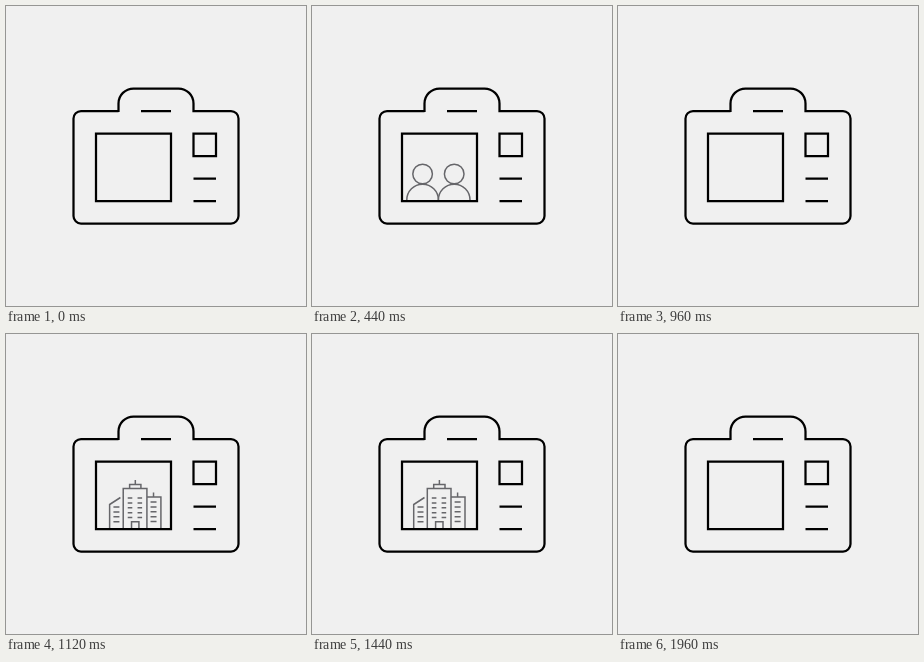
An HTML page that plays this animation: 300 px wide and 300 px high, repeating every 2 s.

```html
<!DOCTYPE html>
<html lang="en">
<head>
<meta charset="utf-8">
<title>Camera</title>
<style>
  html, body { margin: 0; height: 100%; overflow: hidden; background: #f0f0f0; }
  svg { display: block; width: 100vw; height: 100vh; fill: none; stroke: #000; stroke-width: 2.25; }
  .scene { stroke: #66666a; stroke-width: 1.5; }
</style>
</head>
<body>
<svg viewBox="0 0 300 300">
  <clipPath id="view"><path d="M90 127.5h75V195H90z"/></clipPath>
  <g id="camera">
    <g class="scene" clip-path="url(#view)">
      <g id="people">
        <g id="person">
          <circle cx="110.6" cy="168" r="9.8"/>
          <path d="M94.8 195v-1a15.8 15.8 0 0 1 31.6 0v1"/>
        </g>
        <use href="#person" x="31.6"/>
      </g>
      <g id="city">
        <path d="M101.7 195V170.5L112.5 163.5M115.3 195V154.4H139V195M121.7 154.4V150.6H133V154.4M127.4 150.6V146
          M139 163H153V195M145.6 163V158.6M123.6 195V187.7H131V195"/>
        <path id="windows"/>
      </g>
    </g>
    <path d="M112.5 105H75a7.5 7.5 0 0 0-7.5 7.5V210a7.5 7.5 0 0 0 7.5 7.5H225a7.5 7.5 0 0 0 7.5-7.5V112.5a7.5 7.5 0 0 0-7.5-7.5H187.5
      V97.5a15 15 0 0 0-15-15H127.5a15 15 0 0 0-15 15V106M135 105h30
      M90 127.5h75V195H90zM187.5 127.5H210V150H187.5zM187.5 172.5H210M187.5 195H210"/>
  </g>
</svg>
<script>
  const el = id => document.getElementById(id);
  const HALF = 1000, STEP = 40, TRAVEL = 75;

  // Columns of windows: x, first y, width, rows
  const columns = [[105.5, 173, 6, 4], [119.8, 164, 4.6, 5], [129.6, 164, 4.6, 5], [142.6, 168, 6, 5]];
  el('windows').setAttribute('d', columns.map(([x, y, w, rows]) =>
    Array.from({ length: rows }, (_, i) => `M${x} ${y + i * 4.9}h${w}`).join('')).join(''));

  // Slide in over 200 ms, rest, slide out from 840 to 960 ms
  function offset(t) {
    if (t < 200) return TRAVEL * (1 - t / 200) ** 4;
    if (t > 840) return -TRAVEL * Math.min(1, (t - 840) / 120) ** 4;
    return 0;
  }

  function show(id, visible, x) {
    el(id).setAttribute('visibility', visible ? 'visible' : 'hidden');
    el(id).setAttribute('transform', `translate(${x} 0)`);
  }

  function draw(now) {
    const time = Math.floor(now % (2 * HALF) / STEP) * STEP;
    const t = time % HALF, x = offset(t);
    show('people', time < HALF, x);
    show('city', time >= HALF, x);
    const scale = t === 400 ? 0.97 : 1; // shutter click
    el('camera').setAttribute('transform', `translate(150 150) scale(${scale}) translate(-150 -150)`);
  }

  const start = performance.now();
  function loop() {
    draw(performance.now() - start);
    requestAnimationFrame(loop);
  }
  loop();
</script>
</body>
</html>
```
